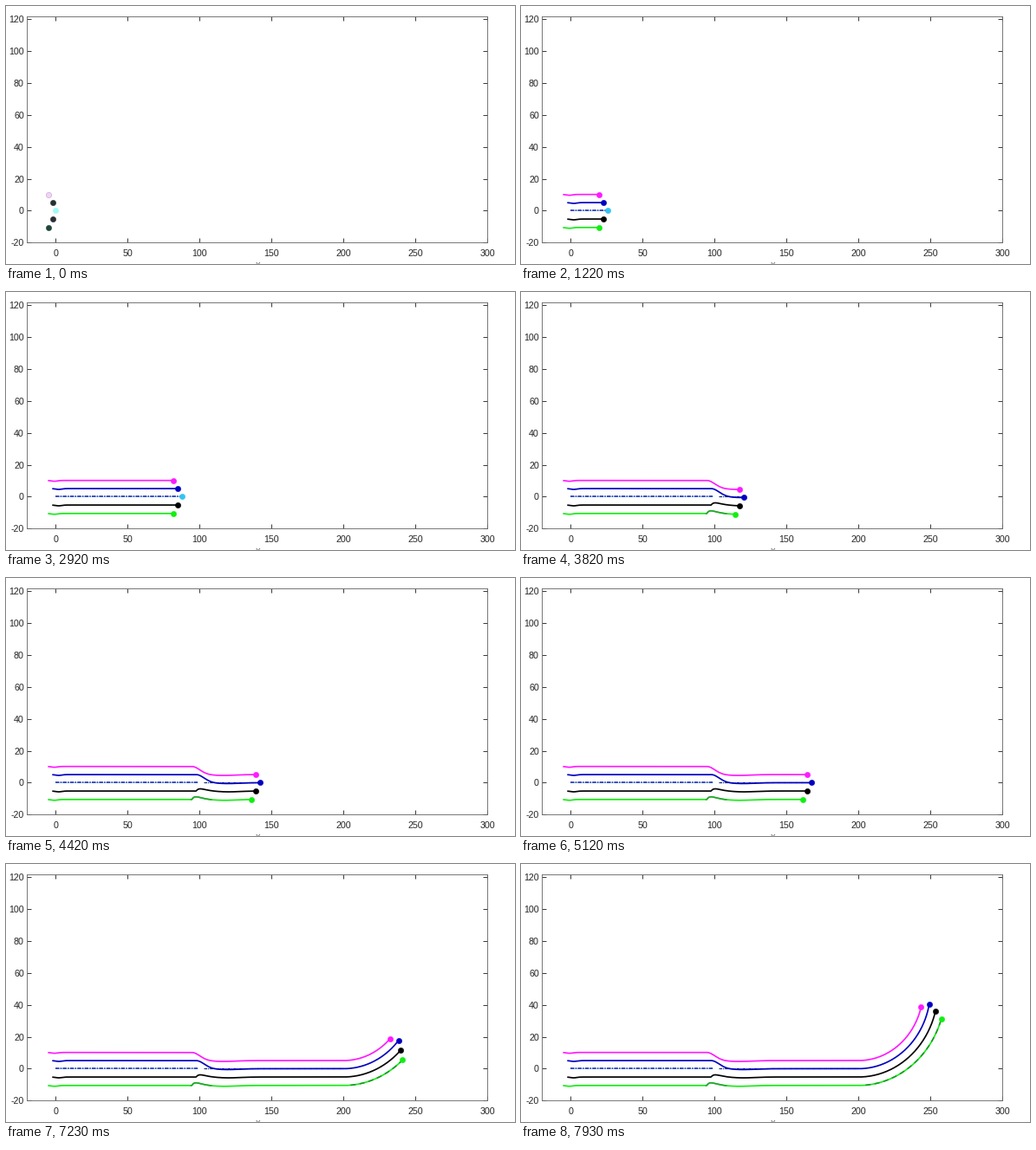
Animation of 587x298 px, one loop 8 s. Source, as a matplotlib script:

```python
import matplotlib.pyplot as plt
import numpy as np
from matplotlib.animation import FuncAnimation

W, H, DPI = 587, 298, 64      # power-of-two dpi keeps the canvas size exact
PX = 72 / DPI                 # one pixel in points
LEFT, RIGHT, TOP, BOTTOM = 24.3, 555.3, 12.3, 273.3
INK, FRAME = "#262626", "#6a6a6a"
TURN_X, TURN_R = 200, 50      # where the left turn starts, radius of the lead
HOLD, LOST = 8, 25            # still frames at the start, last step of the first lead
GAP_END = 103                 # the new lead's guide line starts here

plt.rcParams.update({"font.family": "Liberation Sans", "axes.unicode_minus": False})
fig = plt.figure(figsize=(W / DPI, H / DPI), dpi=DPI, facecolor="white")
ax = fig.add_axes([LEFT / W, 1 - BOTTOM / H, (RIGHT - LEFT) / W, (BOTTOM - TOP) / H])
ax.set(xlim=(-20, 300), ylim=(-20, 121.6),
       xticks=range(0, 301, 50), yticks=range(-20, 121, 20))
ax.tick_params(direction="in", top=True, right=True, length=5 * PX, width=0.9 * PX,
               color=INK, labelcolor=INK, labelsize=10.6 * PX, pad=3.5 * PX)
ax.tick_params(axis="x", pad=7.5 * PX)
for spine in ax.spines.values():
    spine.set(linewidth=0.9 * PX, color=FRAME)
fig.text(291 / W, -4.5 / H, "x", size=11 * PX, color=FRAME, ha="center", va="baseline")


def bell(x, width):
    return np.exp(-(x / width) ** 2)


def lead(n):
    """Distance covered by the head of the group at step n."""
    return 3.62 * n + 8 * (1 - np.exp(-n / 1.5))


def line(color, width=1.7, **kw):
    return ax.plot([], [], color=color, lw=width * PX, **kw)[0]


def dot(color):
    return ax.plot([], [], "o", color=color, ms=6.3 * PX, mew=0.5 * PX, zorder=5)[0]


class Robot:
    """Follows the lead; after its loss it moves up a place or just hops aside."""

    def __init__(self, color, first, lag, home, drop=0, hop=0, rim=None):
        self.color, self.first, self.rim = color, first, rim or first
        self.lag, self.home, self.drop, self.hop = lag, home, drop, hop
        self.trail, self.head = line(color), dot(color)

    def reach(self, n):
        moved_up = 3 * np.clip((n - LOST + 1) / 2, 0, 1) if self.drop else 0
        return lead(n) - self.lag - min(n, 1) + moved_up

    def path(self, s):
        """Point at distance s: straight run, then an arc about a shared centre."""
        x = np.minimum(s, TURN_X)
        z = np.maximum(x - 99.5 + self.lag, 0)
        y = (self.home + self.drop * bell(z, 7.7)
             + self.hop * z / 3 * np.exp(1 - z / 3)
             - 0.55 * bell(z - 22, 12) - 0.5 * bell(x + self.lag - 4, 3))
        angle = np.maximum(s - TURN_X, 0) / TURN_R
        r = TURN_R - y
        return x + r * np.sin(angle), y + r * (1 - np.cos(angle))

    def trace(self, artist, a, b):
        s = np.linspace(a, b, 400) if b > a else np.array([])
        artist.set_data(*self.path(s))

    def draw(self, n):
        s = self.reach(n)
        self.trace(self.trail, -self.lag, s)
        x, y = self.path(s)
        self.head.set_data([x], [y])
        self.head.set(markerfacecolor=self.color if n else self.first,
                      markeredgecolor=self.color if n else self.rim)


magenta = Robot("#ff19ff", "#efd5f3", 5, 5.1, drop=5.1, rim="#c58fd0")
black = Robot("#000000", "#262f33", 2, -5.2, hop=1.4)
green = Robot("#12ee12", "#20463a", 5, -10.5, hop=1.7)
blue = Robot("#0000c0", "#262f33", 2, 0, drop=5.1)
robots = [magenta, black, green, blue]

DASH = (0, (3, 0.8, 1, 0.8))
glow = line("#a8e4f8", 0.8, zorder=1)
guide = line("#0a1cb4", 1.5, ls=DASH, dash_capstyle="butt", zorder=1.5)
guide2 = line("#102a70", 1.2, ls=DASH, dash_capstyle="butt", zorder=1.5)
bump = line("#2f9e3a", 1.6, zorder=3)
bend = line("#1f8f2c", 1.5, ls=(0, (4, 3)), zorder=3)
first_lead = dot("#35c3f0")


def span(artist, a, b):
    artist.set_data([a, max(a, b)], [0, 0])


def update(i):
    n = max(0, i - HOLD + 1)
    u = lead(n)
    for robot in robots:
        robot.draw(n)
    for artist in (glow, guide):
        span(artist, 0, min(u, lead(LOST)))
    span(guide2, GAP_END, min(u, TURN_X))
    green.trace(bump, 94, min(green.reach(n), 108))
    green.trace(bend, TURN_X + 4, green.reach(n))
    if u > TURN_X:
        green.head.set_color("#0d5f0d")

    first_lead.set_data([u], [0])
    first_lead.set_visible(n <= LOST)
    first_lead.set_color("#35c3f0" if n else "#9ffaf5")
    return []


anim = FuncAnimation(fig, update, frames=80, interval=100, init_func=lambda: update(0),
                     repeat=True, repeat_delay=0, blit=False)
plt.show()
```
